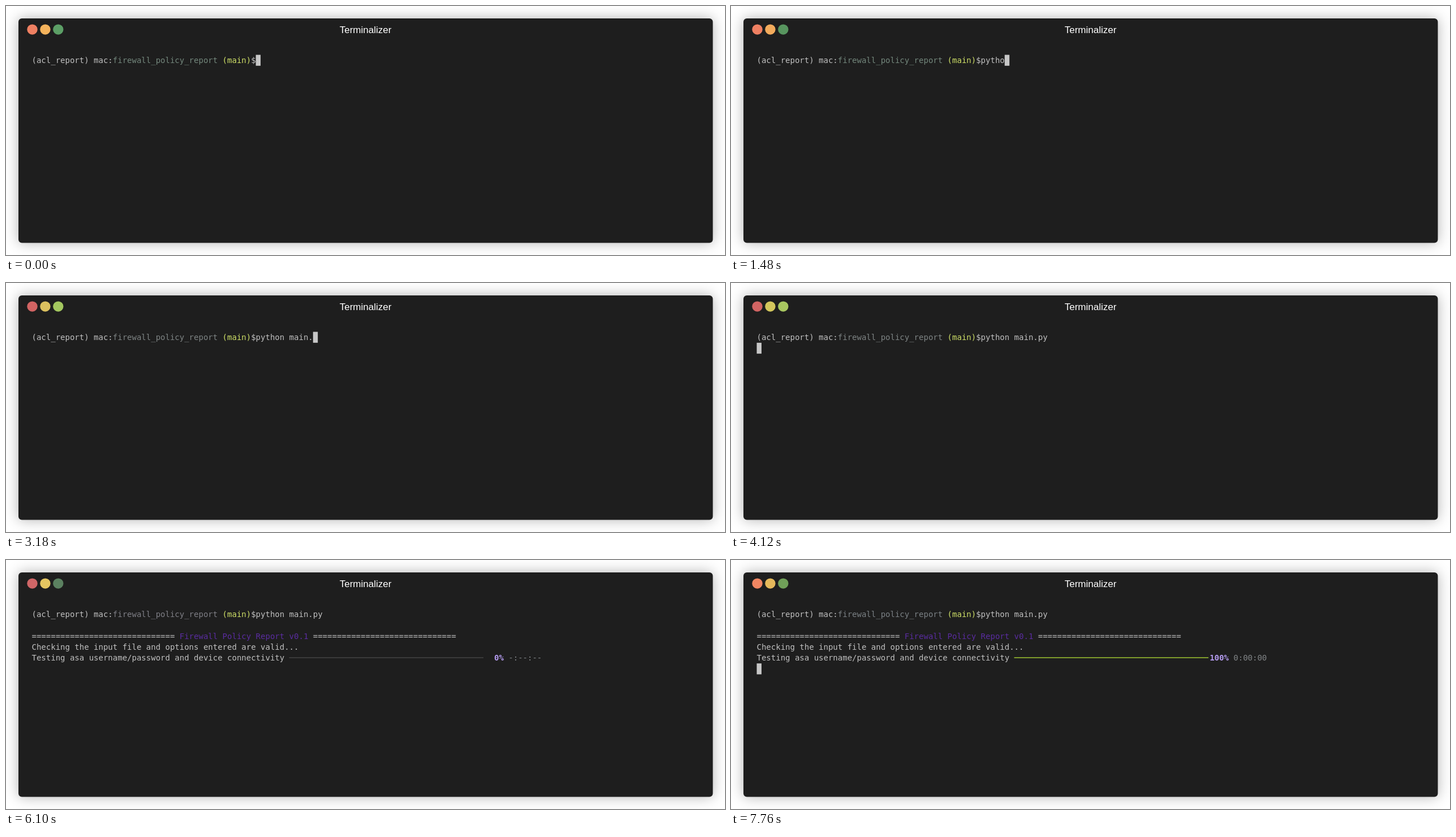
These frames come from a looping animation (1271x441 px, 8 s). An HTML page with a canvas:

```html
<!DOCTYPE html>
<html lang="en">
<head>
<meta charset="utf-8">
<title>Terminal session</title>
<style>
  html, body { margin: 0; width: 100%; height: 100%; overflow: hidden; background: #fff; }
  canvas { display: block; }
</style>
</head>
<body>
<canvas id="stage" width="1271" height="441"></canvas>
<script>
const ctx = document.getElementById("stage").getContext("2d");
const LOOP = 8000;
const LEFT = 45.5, TOP = 86.5, CELL_W = 8.428, CELL_H = 19.33;
const MONO = '14px "DejaVu Sans Mono", monospace';
const TEXT = "#c0c0c0", GREY = "#808486";

const COMMAND = "python main.py";
const KEY_TIMES = [500, 870, 1040, 1220, 1480, 1740, 1960, 2250, 2460, 2590, 2760, 3180, 3610, 3860];
const ENTER = 4120, HEADER = 4980, CHECK = 5080, PROGRESS = 6100, HALF = 7150, DONE = 7760;

// Start time, three window buttons, folder name
const TINTS = [
  [0, "#ef8062", "#f5b35c", "#5c9f66", "#73877c"],
  [500, "#ef8062", "#f3ab5c", "#58955f", "#73877c"],
  [1740, "#d16463", "#ecc062", "#95c75c", "#7e8484"],
  [2760, "#d16463", "#dbc05f", "#a3c75f", "#7e8484"],
  [3860, "#d16463", "#d3c65c", "#a8c660", "#7e8484"],
  [4980, "#cf6667", "#e5c661", "#5b8160", "#7f7f86"],
  [7760, "#f08662", "#e5b95b", "#70a059", "#7b8185"]
];

function write(text, col, row, color, bold) {
  ctx.font = (bold ? "bold " : "") + MONO;
  ctx.textAlign = "left";
  ctx.fillStyle = color;
  const y = TOP + row * CELL_H + 14.5;
  [...text].forEach((ch, i) => ctx.fillText(ch, LEFT + (col + i) * CELL_W, y));
}

function cursor(col, row) {
  ctx.fillStyle = "#c7c7c7";
  ctx.fillRect(LEFT + col * CELL_W, TOP + row * CELL_H, CELL_W, CELL_H);
}

function drawWindow(tint) {
  ctx.fillStyle = "#fff";
  ctx.fillRect(0, 0, 1271, 441);
  ctx.save();
  ctx.shadowColor = "rgba(0,0,0,0.3)";
  ctx.shadowBlur = 24;
  ctx.fillStyle = "#1e1e1e";
  ctx.beginPath();
  ctx.roundRect(22, 22, 1227.5, 397.5, 6);
  ctx.fill();
  ctx.restore();

  for (let i = 0; i < 3; i++) {
    ctx.fillStyle = tint[i + 1];
    ctx.beginPath();
    ctx.arc(46.5 + i * 22.9, 41.6, 9.2, 0, Math.PI * 2);
    ctx.fill();
  }
  ctx.font = '17px "Liberation Sans", Arial, sans-serif';
  ctx.textAlign = "center";
  ctx.fillStyle = "#fff";
  ctx.fillText("Terminalizer", 635.5, 48);
}

function drawBar(t) {
  const x = 500.5, w = 343.5, y = 172, h = 2;
  const fill = (color, from, to) => {
    ctx.fillStyle = color;
    ctx.fillRect(x + w * from, y, w * (to - from), h);
  };
  if (t >= DONE) {
    fill("#7f9c2c", 0, 1);
  } else if (t >= HALF) {
    fill("#f92672", 0, 0.5);
    fill("#3a3a3a", 0.5125, 1);
  } else {
    fill("#3a3a3a", 0, 1);
  }
  const percent = t >= DONE ? 100 : t >= HALF ? 50 : 0;
  write((percent + "%").padStart(4), 95, 4, "#b59cf0", true);
  write(t >= DONE ? "0:00:00" : "-:--:--", 100, 4, GREY);
}

function drawOutput(t) {
  if (t >= HEADER) {
    const rule = "=".repeat(30);
    write(rule, 0, 2, TEXT);
    write("Firewall Policy Report v0.1", 31, 2, "#5a2ca0");
    write(rule, 59, 2, TEXT);
  }
  if (t >= CHECK) write("Checking the input file and options entered are valid...", 0, 3, TEXT);
  if (t >= PROGRESS) {
    write("Testing asa username/password and device connectivity", 0, 4, TEXT);
    drawBar(t);
  }
}

function drawCursor(t, typed) {
  if (t < ENTER) cursor(47 + typed, 0);
  else if (t < HEADER) cursor(0, 1);
  else if (t < CHECK) cursor(0, 3);
  else if (t < PROGRESS) cursor(0, 4);
  else if (t >= DONE) cursor(0, 5);
}

function draw(t) {
  const tint = TINTS.filter(row => row[0] <= t).pop();
  const typed = KEY_TIMES.filter(k => k <= t).length;
  drawWindow(tint);
  write("(acl_report) mac:", 0, 0, TEXT);
  write("firewall_policy_report", 17, 0, tint[4]);
  write("(main)", 40, 0, "#cfe067");
  write("$" + COMMAND.slice(0, typed), 46, 0, TEXT);
  drawOutput(t);
  drawCursor(t, typed);
}

const start = performance.now();
function tick() {
  draw((performance.now() - start) % LOOP);
  requestAnimationFrame(tick);
}
tick();
</script>
</body>
</html>
```
